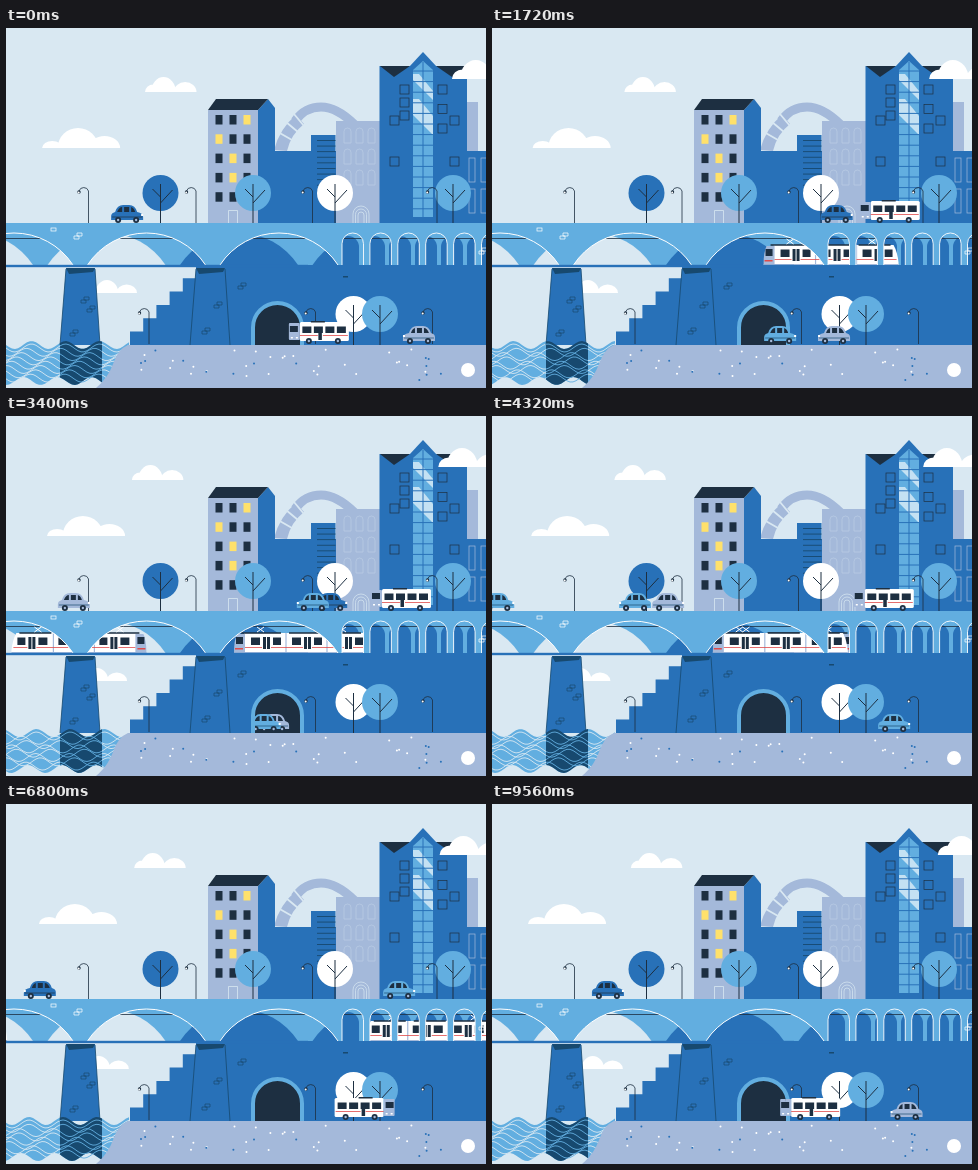
Recreate the animation shown at these times as an HTML page. Size 480x360 px, loop 9.6 s.

```html
<!DOCTYPE html>
<html lang="en">
<head>
<meta charset="utf-8">
<title>City viaduct</title>
<style>
html, body { margin: 0; width: 100%; height: 100%; overflow: hidden; background: #d9e8f2; }
svg { display: block; width: 100vw; height: 100vh; }
</style>
</head>
<body>
<svg id="stage" viewBox="0 0 480 360"></svg>
<script>
const T = 9600;
const SKY = '#d9e8f2', BLUE = '#2871b8', LIGHT = '#62aee0', LAV = '#a4b9da',
      NAVY = '#1d2f41', DEEP = '#17496f', WHITE = '#fff', YELLOW = '#ffe16b', RED = '#df4b4b';

const rect = (x, y, w, h, f, more = '') => `<rect x="${x}" y="${y}" width="${w}" height="${h}" fill="${f}" ${more}/>`;
const poly = (p, f) => `<polygon points="${p}" fill="${f}"/>`;
const path = (d, f = 'none', s = 'none', w = 1) => `<path d="${d}" fill="${f}" stroke="${s}" stroke-width="${w}"/>`;
const line = (d, s, w = 1) => path(d, 'none', s, w);
const disc = (x, y, r, f) => `<circle cx="${x}" cy="${y}" r="${r}" fill="${f}"/>`;
const box = (x, y, w, h, s, k = .8) => rect(x, y, w, h, 'none', `stroke="${s}" stroke-width="${k}"`);
const group = (id, s) => `<g id="${id}">${s}</g>`;
const flipped = (w, s) => `<g transform="translate(${w} 0) scale(-1 1)">${s}</g>`;
const repeat = (n, f) => Array.from({ length: n }, (_, i) => f(i)).join('');

const archTop = (x, y, w, h) => `M${x} ${y + h}V${y + w / 2}a${w / 2} ${w / 2} 0 0 1 ${w} 0V${y + h}`;
const span = cx => `M${cx - 59} 237A70.4 70.4 0 0 1 ${cx + 59} 237`;

function tree(x, y, ground, f) {
  return disc(x, y, 18, f) +
    line(`M${x} ${ground}V${y - 9}M${x} ${y + 10}l12 -13M${x} ${y + 4}l-8 -8`, NAVY);
}
function lamp(x, ground) {
  return line(`M${x} ${ground}v-32a5 5 0 0 0 -9.500 0v1`, NAVY, .8) +
    disc(x - 9.5, ground - 31, 1.7, NAVY) + disc(x - 9.8, ground - 30.5, 1, WHITE);
}
const bricks = (x, y, c) => line(`M${x} ${y}h5v3h-5zM${x - 3} ${y + 3}h5v3h-5z`, c, .7);

// half ellipses on a common base line: centre, half width, height as shares
function cloud(id, w, h, y, bumps) {
  return group(id, path(bumps.map(([c, r, k]) =>
    `M${(c - r) * w} ${y}a${r * w} ${k * h} 0 0 1 ${2 * r * w} 0z`).join(''), WHITE));
}
const PUFF = [[.16, .16, .5], [.36, .24, 1], [.78, .22, .66]];
const WIDE = [[.13, .13, .35], [.46, .26, 1], [.8, .2, .6]];

const wheel = x => disc(x, -3, 3, NAVY) + disc(x, -3, 1.2, LAV);

// vehicles face right and stand on y = 0
function car(id, c, left) {
  const body = path('M0 -3V-7Q0 -10 4 -11Q6 -18 12 -18H18Q24 -18 26 -11Q32 -10 32 -6V-3Z', c) +
    path('M6 -11Q8 -16 11 -16V-11ZM13 -11V-16H18V-11ZM20 -11V-16Q23 -15 24 -11Z', NAVY) +
    line('M1 -6H31', c === BLUE ? NAVY : DEEP, .7) + rect(30, -9, 2, 2, WHITE) + wheel(7) + wheel(25);
  return group(id, left ? flipped(32, body) : body);
}

function bus(id, left) {
  const body = rect(0, -22, 49, 19, WHITE, 'rx="1.5"') + rect(49, -21, 11, 17, LAV, 'rx="1"') +
    rect(24, -23, 14, 1.5, NAVY) +
    repeat(4, i => rect(3 + i * 11.5, -17.5, 9, 6.5, NAVY)) + rect(27, -17, 3.5, 13, NAVY) +
    rect(51, -18, 8, 6, NAVY) + line('M1 -8.500H26M31 -8.500H49', RED, .8) +
    rect(51, -7, 2, 1.5, WHITE) + rect(56, -7, 2, 1.5, WHITE) + wheel(11) + wheel(40);
  return group(id, left ? flipped(60, body) : body);
}

function train(id, left) {
  const coach = x => rect(x + 6, 221.5, 8, 7.5, NAVY) + rect(x + 17, 221, 3, 12, NAVY) +
    rect(x + 21, 221, 3, 12, NAVY) + rect(x + 27, 221.5, 9, 7.5, NAVY);
  const body = path('M0 235Q1 224 5 217H125V237H0Z', WHITE) + path('M124 218H132Q135 224 135 237H124Z', LAV) +
    rect(126, 221, 7, 7, NAVY) + rect(126, 232, 8, 1.5, RED) +
    line('M8 217H40M48 217H80M88 217H128', NAVY, 1.6) +
    repeat(3, i => coach(i * 41)) + line('M42 217V236M83 217V236', LAV, 1.2) +
    line('M2 231.500H16M25 231.500H57M66 231.500H98M107 231.500H124', RED, .8) +
    line('M0 236.500H135', LAV) + repeat(2, i => line(`M${23 + i * 82} 211l7 5m0 -5l-7 5`, WHITE));
  return group(id, left ? flipped(135, body) : body);
}

function oldBlock() {
  const rows = ['DDY', 'YDD', 'DYD', 'DYD', 'DDD'];
  return rect(202, 82, 51, 113, LAV) + poly('252,82 262,71 269,80 269,195 252,195', BLUE) +
    poly('202,82 210,71 262,71 252,82', NAVY) +
    rows.map((r, j) => [...r].map((c, i) =>
      rect(209.5 + i * 14, 87 + j * 19.3, 7, 9.5, c === 'Y' ? YELLOW : NAVY)).join('')).join('') +
    line('M222.500 195V182.500H231.500V195', SKY, .8);
}

function midBlocks() {
  return line('M289 93Q299 79 315 79T349 97', LAV, 9) +
    path('M268 122Q274 100 290 87L298 96Q285 106 281 123Z', LAV) +
    line('M272 104L286 112M280 94L292 104M288 86L298 98', SKY, 1.8) +
    rect(461, 74, 11, 60, LAV) + rect(461, 123, 19, 72, BLUE) +
    rect(268, 123, 62, 72, BLUE) + rect(305, 107, 24.5, 88, BLUE) +
    repeat(10, i => rect(311, 112 + i * 5.6, 18.5, .9, DEEP)) +
    rect(330, 93, 44, 102, LAV) +
    repeat(9, i => line(archTop(338 + i % 3 * 12, 100 + (i / 3 | 0) * 21, 7, 15) + 'z', '#b9cbe4', .8)) +
    repeat(3, i => line(archTop(347 + i * 2.5, 178 + i * 3, 16 - i * 5, 17 - i * 3), SKY, .7)) +
    repeat(4, i => box(463 + i % 2 * 12, 130 + (i >> 1) * 31, 6, 24, LAV, .7));
}

function tower() {
  const hole = (x, y) => box(x, y, 9, 9, NAVY, .7);
  return rect(373.5, 38, 87.5, 157, BLUE) + poly('374,38 404,38 388,49', NAVY) + poly('430,38 461,38 446,49', NAVY) +
    poly('403,39 417,24 431,39 431,50 403,50', BLUE) +
    poly('407,42 417,33 427,42 427,189 407,189', LIGHT) +
    repeat(2, i => poly([[407, 46], [413, 46], [427, 63], [427, 72 + i * 10], [407, 52 + i * 10]]
      .map(([x, y]) => x + ',' + (y + i * 25)).join(' '), '#c4e1f3')) +
    line('M417 34V189' + repeat(14, i => `M407 ${43 + i * 10.6}H427`), BLUE) +
    repeat(3, i => hole(394, 57 + i * 13) + hole(432, 57 + i * 19.5)) +
    repeat(2, i => hole(384, 88 + i * 41) + hole(444, 88 + i * 41));
}

function bank() {
  return path('M124 317' + repeat(6, i => `V${(303.500 - i * 13.3).toFixed(1)}h13.200`) + 'H480V317Z', BLUE) +
    path(archTop(247, 275, 49, 42), NAVY, LIGHT, 4);
}

function pier(x) {
  return poly(`${x},240 ${x + 29},240 ${x + 34},317 ${x - 6},317`, BLUE) +
    poly(`${x},240 ${x + 29},240 ${x + 27},244 ${x + 3},246`, DEEP) +
    line(`M${x} 241L${x - 6} 317M${x + 29} 241L${x + 34} 317`, DEEP, .8);
}

function ground() {
  let seed = 11;
  const rnd = () => (seed = seed * 16807 % 2147483647) / 2147483647;
  return path('M122 317H480V360H90Q102 350 107 336Q112 321 122 317Z', LAV) +
    repeat(42, i => disc((135 + rnd() * 300).toFixed(1), (321 + rnd() * 31).toFixed(1), 1, i % 3 ? WHITE : BLUE)) +
    disc(462, 342, 7, WHITE);
}

function viaduct() {
  const big = [0, 1, 2].map(i => 8 + i * 132.5), small = [0, 1, 2, 3, 4, 5].map(i => 336 + i * 27.9);
  const open = big.map(c => span(c) + 'Z').join('') + small.map(x => archTop(x, 205, 21.5, 32) + 'z').join('');
  return `<clipPath id="openings"><path d="${open}"/></clipPath>` + rect(0, 195, 480, 42, LIGHT) +
    '<g clip-path="url(#openings)">' +
    repeat(4, i => path(span(-32 + i * 132.5) + 'Z', i < 2 ? SKY : BLUE)) +
    rect(334, 204, 146, 34, LIGHT) + repeat(6, i => path(archTop(331 + i * 26, 208, 22, 30), BLUE)) +
    line('M0 210.500H480', NAVY, .8) + train('trainR') + train('trainL', true) + '</g>' +
    line(big.map(span).join(''), WHITE) + line(small.map(x => archTop(x, 205, 21.5, 32)).join(''), WHITE, .9) +
    rect(0, 236.8, 302, 2.4, BLUE) + box(45, 200, 5, 3, WHITE, .7) + bricks(71, 205, WHITE) + bricks(476, 220, WHITE);
}

document.getElementById('stage').innerHTML =
  rect(0, 0, 480, 360, SKY) + cloud('cloudA', 51.5, 15, 64, PUFF) + cloud('cloudB', 78, 20, 120, WIDE) +
  cloud('cloudD', 47, 13, 265, PUFF) + midBlocks() + oldBlock() + tower() + cloud('cloudC', 66, 19, 51, PUFF) +
  tree(154.5, 165, 195, BLUE) + tree(247, 165, 195, LIGHT) + tree(329, 165, 195, WHITE) + tree(447, 165, 195, LIGHT) +
  [82.5, 190, 306.5, 431].map(x => lamp(x, 195)).join('') +
  bus('busTop', true) + car('darkB', BLUE) + car('lightA', LIGHT, true) + car('lightB', LIGHT) +
  car('darkC', BLUE, true) + car('lavTop', LAV) + car('darkA', BLUE) +
  bank() + viaduct() + group('waves', '') + pier(60) + pier(190) +
  bricks(78, 269, DEEP) + bricks(67, 302, DEEP) + bricks(84, 278, DEEP) + bricks(199, 300, DEEP) +
  bricks(211, 274, DEEP) + bricks(235, 255, DEEP) + rect(337, 248, 5, 1.5, DEEP) +
  group('wet', '') + ground() +
  tree(347.5, 286, 317, WHITE) + tree(374, 286, 317, LIGHT) + [143, 309.5, 426.5].map(x => lamp(x, 316)).join('') +
  '<clipPath id="exit"><path d="M249 317V298a22.500 22.500 0 0 1 45 0V270H480V318H249Z"/></clipPath><g clip-path="url(#exit)">' +
  car('lavLow', LAV, true) + car('lightC', LIGHT) + car('lightD', LIGHT) + bus('busOut') + bus('busIn', true) + '</g>';

const ROAD = 195, QUAY = 316;
const now = (t, at) => ((t - at + T * 1.5) % T - T / 2) / 1000;

// x at one moment, speed in px/s
const roll = (y, x, at, speed, gain = 0) => t => {
  const s = now(t, at);
  return [x + speed * s + gain * s * s, y];
};
// slows to a stop at x, then pulls away again
const halt = (y, x, at, force, power = 3) => t => [x + force * now(t, at) ** power, y];
// out and back over one loop
const drift = (x, reach, power = 1) => t => [x + reach * Math.abs(1 - 2 * t / T) ** power, 0];

const moves = {
  cloudA: drift(120.5, 18.5),
  cloudB: t => [37 + 4.5 * Math.sin((t - 300) / T * 2 * Math.PI), 0],
  cloudC: drift(431, 15, 2),
  cloudD: drift(70, 14),
  trainL: halt(0, 228, 3400, -9.2),
  trainR: halt(0, 269, 5400, 33),
  busTop: halt(ROAD, 365, 3000, -.8, 5),
  darkA: roll(ROAD, 105, 0, 130),
  darkB: roll(ROAD, 309, 3400, 210),
  darkC: roll(ROAD, 208, 5800, -190),
  lightA: roll(ROAD, 291, 3400, -178),
  lightB: roll(ROAD, 221, 5800, 156),
  lavTop: roll(ROAD, 160, 4320, 125, 8),
  lightC: roll(QUAY, 272, 1720, 150),
  lightD: roll(QUAY, 386, 4320, 156),
  lavLow: roll(QUAY, 397, 0, -39.5, -1),
  busOut: halt(QUAY, 328.6, 6700, 21.4),
  busIn: roll(QUAY, 283, 0, -132)
};

function wave(x0, x1, y, shift) {
  let d = '';
  for (let x = x0; x <= x1; x += 3)
    d += (d ? 'L' : 'M') + x + ' ' + (y + 4 * Math.sin((x + shift) * Math.PI / 17)).toFixed(2);
  return d;
}
// band of water with a wavy top and foot
function water(x0, x1, fill, foam, sway) {
  const foot = wave(x0, x1, 353, sway + 8).slice(1).split('L').reverse().join('L');
  return path(wave(x0, x1, 317, sway) + 'L' + foot + 'Z', fill) +
    repeat(8, i => line(wave(x0, x1, 320 + i * 4.3, sway * (i % 2 ? -1 : 1) + i * 5), foam, .9));
}

const node = {};
['waves', 'wet', ...Object.keys(moves)].forEach(id => node[id] = document.getElementById(id));

function draw(t) {
  for (const id in moves) {
    const [x, y] = moves[id](t);
    node[id].setAttribute('transform', `translate(${x.toFixed(2)} ${y})`);
  }
  const sway = 5 * Math.sin(t / T * Math.PI * 4);
  node.waves.innerHTML = water(0, 123, LIGHT, SKY, sway);
  node.wet.innerHTML = water(54, 96, DEEP, LIGHT, sway);
}

const start = performance.now();
function tick() {
  draw((performance.now() - start) % T);
  requestAnimationFrame(tick);
}
draw(0);
requestAnimationFrame(tick);
</script>
</body>
</html>
```
